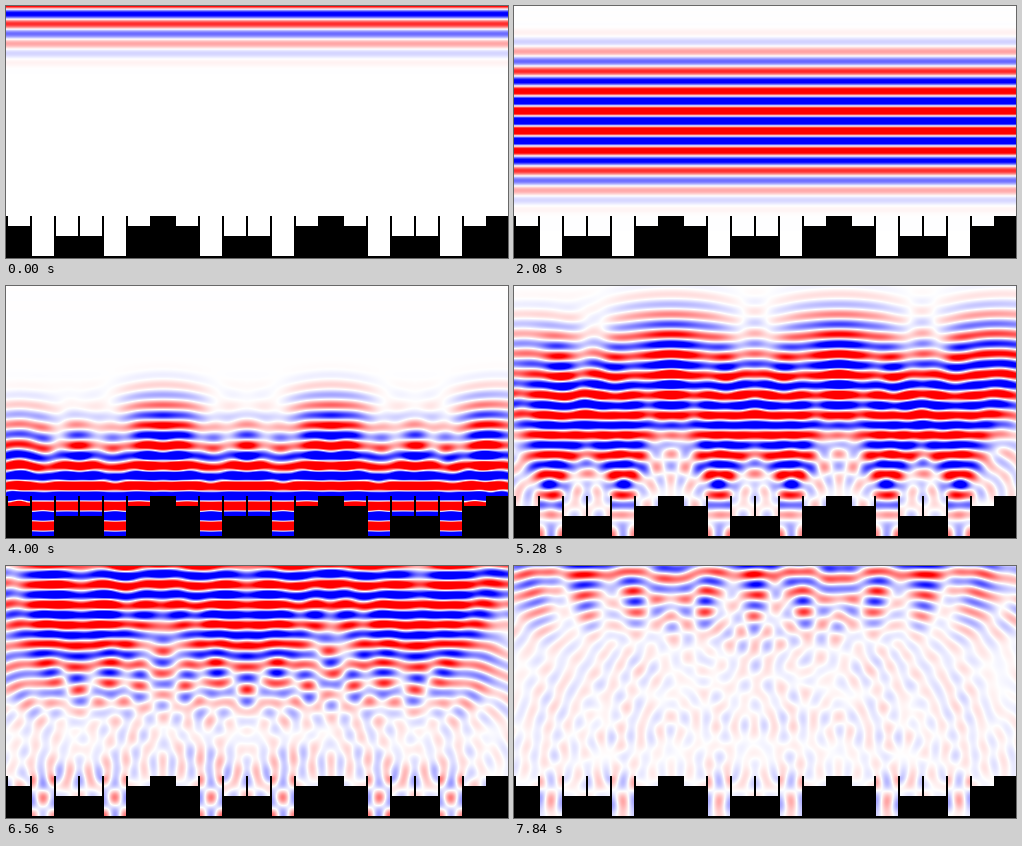
Recreate the animation shown at these times as a matplotlib script. Size 502 by 252 pixels, loop 8000 ms.

```python
import numpy as np
import matplotlib.pyplot as plt
from matplotlib.animation import FuncAnimation

# Sound pulse hitting a rigid quadratic-residue diffuser (N = 7)
W, H, DPI = 502, 252, 64
FRAMES, INTERVAL = 50, 160
SUBSTEPS = 16
C = np.sqrt(0.5)              # cells per step, 2D stability limit

SIDE, ABOVE, BELOW = 200, 140, 12   # hidden margins around the stage
TOP, CELL, FIN, UNIT = 210, 24, 2, 10
N = 7

WAVELENGTH, PULSE = 20, 200
CENTRE, GAIN = -32.3, 1.65


def pulse(y):
    d = y - CENTRE
    window = np.where(abs(d) < PULSE / 2, np.cos(np.pi * d / PULSE) ** 2, 0)
    return -GAIN * window * np.cos(2 * np.pi * d / WAVELENGTH)


def diffuser():
    solid = np.zeros((H, W), bool)
    solid[TOP:] = True
    for k in range(W // CELL + 1):
        depth = UNIT * ((k + 1) ** 2 % N)
        x = k * CELL + FIN
        solid[TOP:TOP + depth, x:x + CELL - FIN] = False
    return solid


def simulate(solid):
    rows, cols = ABOVE + H + BELOW, SIDE + W + SIDE
    view = np.s_[ABOVE:ABOVE + H, SIDE:SIDE + W]
    air = np.ones((rows, cols), np.float32)
    air[view] = ~solid
    # no flow through faces that touch the solid
    open_x = C.astype(np.float32) * air[:, 1:] * air[:, :-1]
    open_y = C.astype(np.float32) * air[1:] * air[:-1]

    y = np.arange(rows) - ABOVE
    p = np.repeat(pulse(y)[:, None], cols, 1).astype(np.float32) * air
    vx = np.zeros((rows, cols + 1), np.float32)
    vy = np.zeros((rows + 1, cols), np.float32)
    vy[1:-1] = pulse(y[:-1] + 0.5 + C / 2)[:, None] * (open_y > 0)

    c = np.float32(C)
    k = np.float32((C - 1) / (C + 1))
    shots = []
    for _ in range(FRAMES):
        shots.append(p[view].copy())
        for _ in range(SUBSTEPS):
            vx[:, 1:-1] -= open_x * (p[:, 1:] - p[:, :-1])
            vy[1:-1] -= open_y * (p[1:] - p[:-1])
            edge, inner = p[-1].copy(), p[-2].copy()
            p -= c * (vx[:, 1:] - vx[:, :-1] + vy[1:] - vy[:-1])
            p[-1] = inner + k * (p[-2] - edge)   # absorbing lower edge
    return shots


def colour(p):
    rgb = np.ones((H, W, 3))
    rgb[..., 0] = 1 - np.clip(-p, 0, 1)
    rgb[..., 1] = 1 - np.clip(abs(p), 0, 1)
    rgb[..., 2] = 1 - np.clip(p, 0, 1)
    rgb[solid] = 0
    return rgb


solid = diffuser()
shots = simulate(solid)

fig = plt.figure(figsize=(W / DPI, H / DPI), dpi=DPI)
ax = fig.add_axes([0, 0, 1, 1])
ax.axis("off")
image = ax.imshow(colour(shots[0]), aspect="auto", interpolation="nearest")


def draw(i):
    image.set_data(colour(shots[i]))
    return [image]


anim = FuncAnimation(fig, draw, frames=FRAMES, interval=INTERVAL,
                     repeat=True, repeat_delay=0, blit=False)
plt.show()
```
